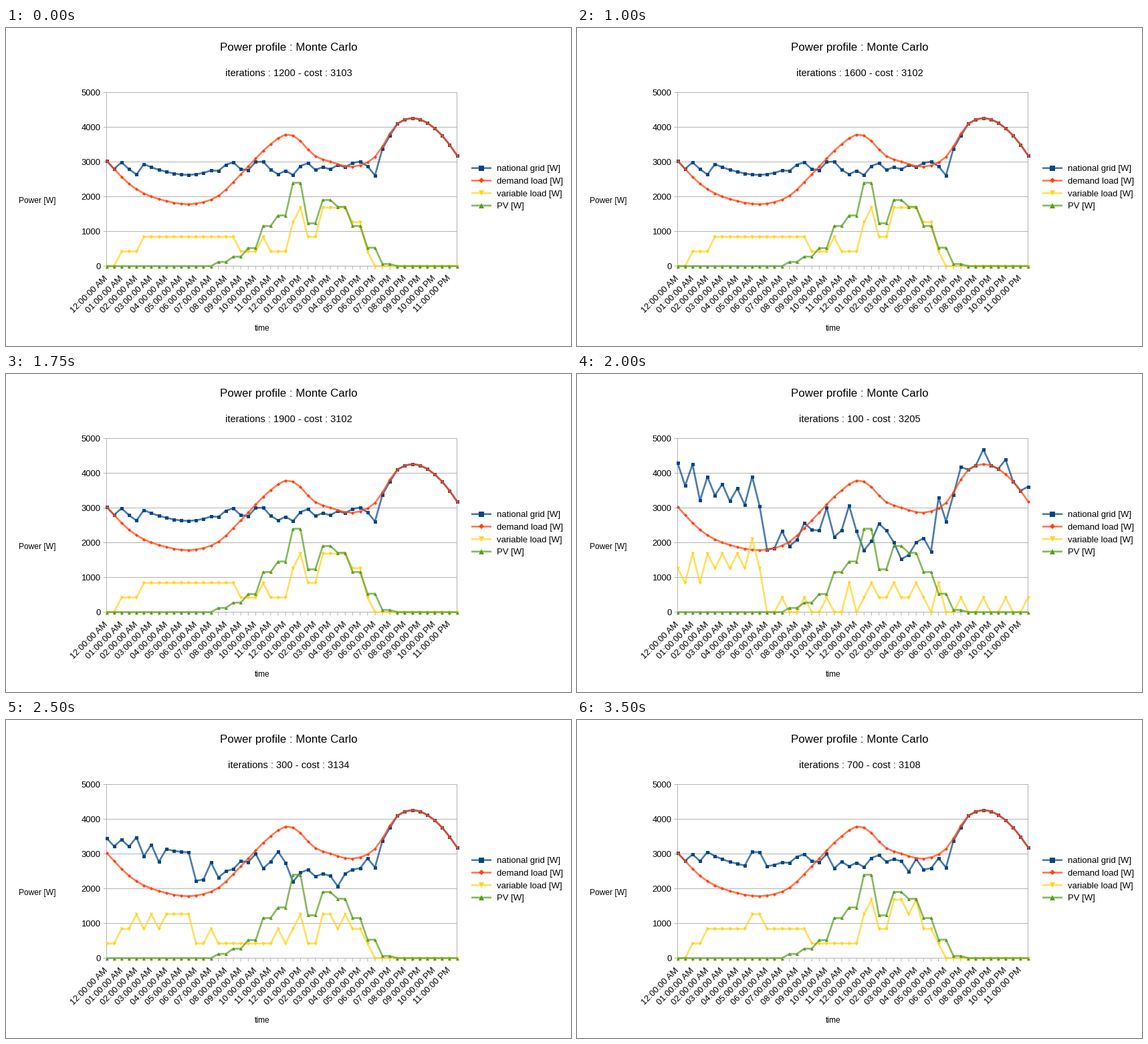
A matplotlib script for the animation above (3.75 s loop, 845 by 476 pixels).

```python
import matplotlib.pyplot as plt
import numpy as np
from matplotlib.animation import FuncAnimation

W, H, DPI = 845, 476, 64
SLOTS = 48
LEFT, RIGHT, TOP, BOTTOM = 150.5, 674.5, 96.5, 356.5
UNIT = 421        # watts of one shiftable load
GRID_GOAL = 2820  # watts the search tries to keep the grid at

GRID, DEMAND, VARIABLE, PV = "#004586", "#ff420e", "#ffd320", "#579d1c"
GRAY = "#b3b3b3"
STEPS = [*range(1200, 2000, 100), *range(100, 800, 100)]

plt.rcParams["font.family"] = "Liberation Sans"


def smooth(x, keys):
    """Cubic Hermite curve through (position, value) keys."""
    kx, ky = np.array(keys, float).T
    slope = np.gradient(ky, kx)
    j = np.clip(np.searchsorted(kx, x, "right") - 1, 0, len(kx) - 2)
    h = kx[j + 1] - kx[j]
    t = (x - kx[j]) / h
    ease = t * t * (3 - 2 * t)
    return (ky[j] * (1 - ease) + ky[j + 1] * ease
            + h * t * (1 - t) * (slope[j] * (1 - t) - slope[j + 1] * t))


slot = np.arange(SLOTS)
demand = smooth(slot, [
    (0, 3030), (3, 2370), (8, 1875), (12, 1803), (15, 2025), (18, 2645),
    (22, 3510), (24, 3788), (25, 3760), (28, 3165), (30, 3010), (33, 2865),
    (36, 3145), (39, 4100), (41, 4262), (44, 3970), (47, 3190), (48, 2840)])

# Solar power changes once an hour, from 07:30 on.
pv = np.zeros(SLOTS)
pv[15:39] = np.repeat([122, 275, 520, 1155, 1460, 2402,
                       1235, 1905, 1710, 1155, 532, 62], 2)

# The search starts with most load at night and ends with a flat grid curve.
night = 2.75 + 0.12 * slot + 0.7 * (-1.0) ** slot
noon = 0.5 + 0.7 * np.exp(-((slot - 29) / 8) ** 2)
day = noon * (1 + np.cos(2 * np.pi * (slot - 2) / 3))
first = np.where(slot < 12, night, day)
ideal = (GRID_GOAL - demand + pv) / UNIT


def variable_load(step):
    rest = np.exp(-(step - 100) / 250)
    units = np.rint(ideal + rest * (first - ideal))
    return np.maximum(units, 0) * UNIT


def cost(step):
    return round(np.interp(step, [100, 300, 500, 700, 1200, 1300],
                           [3205, 3134, 3111, 3108, 3103, 3102]))


def pt(px):
    return px * 72 / DPI


def to_y(watts):
    return BOTTOM - np.asarray(watts) * (BOTTOM - TOP) / 5000


fig = plt.figure(figsize=(W / DPI, H / DPI), dpi=DPI, facecolor="white")
ax = fig.add_axes([0, 0, 1, 1])
ax.set_xlim(0, W)
ax.set_ylim(H, 0)
ax.axis("off")


def label(x, y, text, px, ha="left", **kw):
    return ax.text(x, y, text, fontsize=pt(px), ha=ha, va="baseline",
                   color="black", **kw)


def rule(xs, ys):
    ax.plot(xs, ys, color=GRAY, lw=pt(1), solid_capstyle="butt",
            snap=False, zorder=1)


def series(x, y, color, marker, size):
    """Translucent line with solid markers on top."""
    line, = ax.plot(x, y, color=color, alpha=0.7, lw=pt(2.7), snap=False,
                    solid_joinstyle="round", solid_capstyle="butt")
    if len(x) == 2:
        x, y = [np.mean(x)], [np.mean(y)]
    dots, = ax.plot(x, y, ls="", marker=marker, color=color,
                    ms=pt(size), mew=0, snap=False)
    return line, dots


xs = np.linspace(LEFT, RIGHT, SLOTS)

# Axes
for watts in range(0, 5001, 1000):
    y = float(to_y(watts))
    rule([LEFT - 5, RIGHT], [y, y])
    label(141.5, y + 4.5, str(watts), 13, "right")
for x in (LEFT, RIGHT):
    rule([x, x], [TOP, BOTTOM])
for i, x in enumerate(xs):
    rule([x, x], [BOTTOM, BOTTOM + 5])
    if i % 2 == 0:
        hour = i // 2
        half = "AM" if hour < 12 else "PM"
        label(x + 2.5, 375, f"{hour % 12 or 12:02d}:00:00 {half}", 13, "right",
              rotation=45, rotation_mode="anchor")

# Titles
label(422.5, 34, "Power profile : Monte Carlo", 16.9, "center")
subtitle = label(422.5, 72, "", 14.6, "center")
label(19, 262, "Power [W]", 12)
label(383.5, 453, "time", 12, "center")

# Series and legend
STYLES = [
    ("national grid [W]", GRID, "s", 5, 8),
    ("demand load [W]", DEMAND, "D", 3.6, 6),
    ("variable load [W]", VARIABLE, "v", 5, 8),
    ("PV [W]", PV, "^", 5, 8),
]
curves = []
for row, (name, color, marker, small, large) in enumerate(STYLES):
    curves.append(series(xs, to_y(demand), color, marker, small))
    y = 209.7 + 18.7 * row
    series([696, 726], [y, y], color, marker, large)
    label(733.5, y + 4.5, name, 13.1)


def set_curve(index, watts):
    for part in curves[index]:
        part.set_ydata(to_y(watts))


set_curve(3, pv)


def draw(frame):
    step = STEPS[frame]
    variable = variable_load(step)
    set_curve(0, demand + variable - pv)
    set_curve(2, variable)
    subtitle.set_text(f"iterations : {step} - cost : {cost(step)}")


anim = FuncAnimation(fig, draw, frames=len(STEPS), interval=250,
                     init_func=lambda: draw(0), repeat=True, repeat_delay=0)
plt.show()
```
